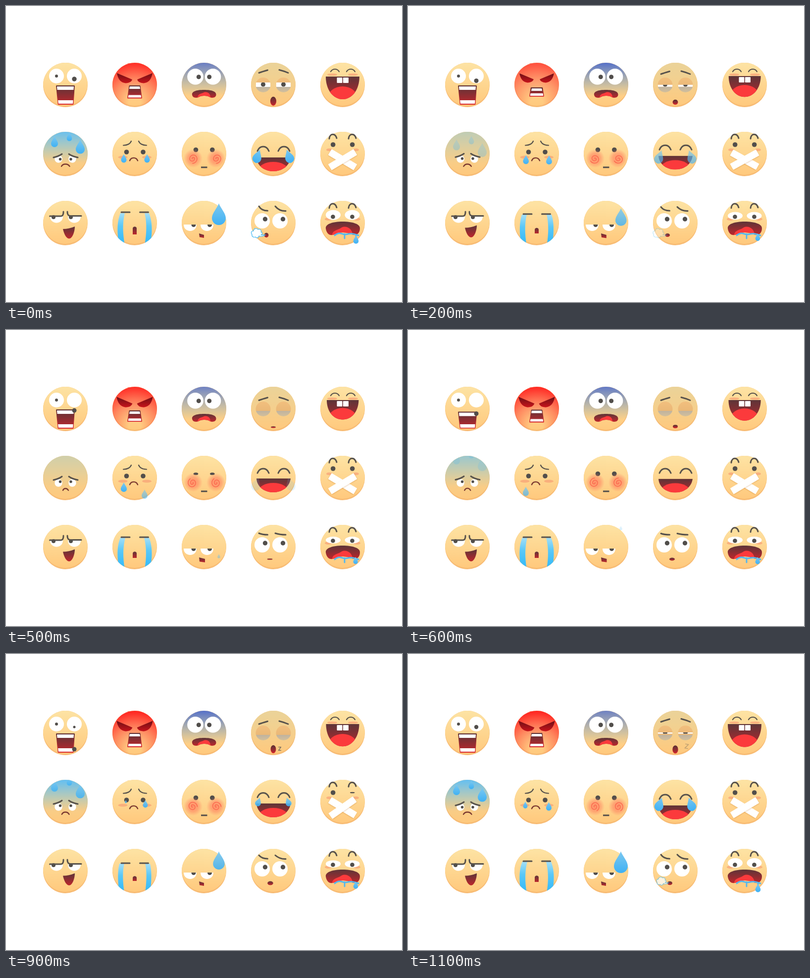
Animation of 800 by 600 pixels, one loop 1200 ms. Source, as an HTML page:

```html
<!DOCTYPE html>
<html lang="en">
<head>
<meta charset="utf-8">
<title>Fifteen moods</title>
<style>
  html, body { margin: 0; width: 100%; height: 100%; overflow: hidden; background: #fff; }
  svg { display: block; width: 800px; height: 600px; }
  .line { fill: none; stroke: #57524c; stroke-width: 3; stroke-linecap: round; stroke-linejoin: round; }
  .thin { stroke-width: 2.2; }
  .frown { fill: none; stroke: #7b3a31; stroke-width: 2.4; stroke-linecap: round; }
  .ink { fill: #514e4b; }
  .white { fill: #fff; }
  .red { fill: #fb3a3c; }
  .blush { fill: #f7a377; opacity: .75; }
  .mouth { fill: url(#gum); }
  .lips { fill: url(#gum); stroke: url(#lip); stroke-width: 1.8; stroke-linejoin: round; }
  .drop { fill: url(#water); }
  .tape { fill: #fff; filter: drop-shadow(0 1px 1px rgba(190, 110, 30, .35)); }
  .swirl { fill: none; stroke: #fb6a50; stroke-width: 1.5; stroke-linecap: round; }
  .zed { font: bold 11px Lato, "Open Sans", sans-serif; fill: #6f675c; }
</style>
</head>
<body>
<!-- data-<attr>="step:pose;…" holds the poses of one attribute over twelve steps -->
<svg viewBox="0 0 800 600">
  <defs>
    <linearGradient id="skin" x2="0" y2="1"><stop stop-color="#fde4a5"/><stop offset="1" stop-color="#ffc97d"/></linearGradient>
    <linearGradient id="gum" x2="0" y2="1"><stop stop-color="#5d3538"/><stop offset="1" stop-color="#bd262c"/></linearGradient>
    <linearGradient id="lip" x2="0" y2="1"><stop stop-color="#5c2c2f"/><stop offset="1" stop-color="#d9292f"/></linearGradient>
    <linearGradient id="water" x2="0" y2="1"><stop stop-color="#7cc8f0"/><stop offset="1" stop-color="#3fb1f4"/></linearGradient>
    <linearGradient id="stream" x2="0" y2="1"><stop stop-color="#a5def6"/><stop offset=".4" stop-color="#5ac8f8"/><stop offset="1" stop-color="#2fb8f8"/></linearGradient>
    <linearGradient id="glare" x2="0" y2="1"><stop stop-color="#6d0f15"/><stop offset="1" stop-color="#c8141b"/></linearGradient>
    <radialGradient id="rage" gradientUnits="userSpaceOnUse" cx="0" cy="36" r="82"><stop offset=".15" stop-color="#ff2a24" stop-opacity="0"/><stop offset=".55" stop-color="#ff2a24" stop-opacity=".45"/><stop offset=".95" stop-color="#ff2a24"/></radialGradient>
    <linearGradient id="fear" x2="0" y2="1"><stop stop-color="#556fc8"/><stop offset=".75" stop-color="#6a9cc0" stop-opacity="0"/></linearGradient>
    <linearGradient id="chill" x2="0" y2="1"><stop stop-color="#64bff2"/><stop offset=".7" stop-color="#7cc4e0" stop-opacity="0"/></linearGradient>
    <linearGradient id="dusk" x2="0" y2="1"><stop stop-color="#a89870" stop-opacity=".22"/><stop offset="1" stop-color="#a89870" stop-opacity="0"/></linearGradient>
    <linearGradient id="bag" x2="0" y2="1"><stop stop-color="#f2bf7e"/><stop offset=".63" stop-color="#eab877"/><stop offset=".63" stop-color="#bfb3a0"/><stop offset="1" stop-color="#d3bf9b"/></linearGradient>
    <radialGradient id="flush"><stop stop-color="#ff7a5c" stop-opacity=".75"/><stop offset=".55" stop-color="#ff7a5c" stop-opacity=".5"/><stop offset="1" stop-color="#ff7a5c" stop-opacity="0"/></radialGradient>

    <clipPath id="disc"><circle r="45"/></clipPath>
    <clipPath id="slit"><rect x="-15" width="30" y="-5" height="9"
      data-y="0:-5;1:-3.5;3:3;4:4;9:4;11:-1" data-height="0:9;1:6.5;3:1.3;4:0;9:0;11:2.5"/></clipPath>
    <clipPath id="laugh"><path data-d="0:M-34 -17 L34 -17 C34 10 19 29 0 29 C-19 29 -34 10 -34 -17Z;1:M-32.5 -18 L33 -18 C33 8 18 27 0 27 C-18 27 -32.5 8 -32.5 -18Z;3:M-32 -18 L32.5 -18 C32 6 18 21.5 0 21.5 C-18 21.5 -32 6 -32 -18Z;5:M-32 -18 L32.5 -18 C32 6 18 21.5 0 21.5 C-18 21.5 -32 6 -32 -18Z;7:M-33 -18 L33 -18 C33 8 18 26 0 26 C-18 26 -33 8 -33 -18Z;11:M-34 -18 L34 -18 C34 10 19 28.5 0 28.5 C-19 28.5 -34 10 -34 -18Z"/></clipPath>
    <clipPath id="grin"><path d="M-34 7H35C33 24 18 35 0 35S-33 24 -34 7Z"/></clipPath>
    <clipPath id="lids"><path d="M-30 9L-6 0H6L30 9V30H-30Z" data-transform="0:translate(0 0);3:translate(0 -1);5:translate(0 -3);7:translate(0 -4);9:translate(0 -3);11:translate(0 0)"/></clipPath>
    <clipPath id="below"><rect x="-45" y="3" width="90" height="30"/></clipPath>

    <g id="base">
      <circle r="45" fill="#f8bc74"/>
      <circle cy="-3" r="45" fill="url(#skin)" clip-path="url(#disc)"/>
    </g>
    <path id="drop" class="drop" d="M0 0C3 9 14 20 14 30A14 14 0 0 1 -14 30C-14 20 -3 9 0 0Z"/>
    <g id="sleepy">
      <circle r="15" fill="url(#bag)"/>
      <g clip-path="url(#slit)"><circle class="white" r="15"/><circle class="ink" cy="-1" r="4.6"/></g>
    </g>
    <path id="angry" fill="url(#glare)" d="M-36 -24L-5 -11Q-7 -4 -18 -3.5Q-33 -5 -36 -24Z"
      data-transform="0:translate(0 0) scale(1);1:translate(-1 -1) scale(.96);3:translate(-2 -1.5) scale(.89);5:translate(.5 .3) scale(1.03);11:translate(.5 .3) scale(1.03)"/>
    <path id="arc" class="line" d="M-11.5 0Q-8 -9 0 -9T11.5 0"/>
    <path id="arch" class="line" stroke-width="4" d="M-7 4C-6 -7 5 -8 8 3"/>
    <path id="lidded" class="white" d="M-13 0H13C13 8 7 13 0 13S-13 8 -13 0Z"/>
    <path id="spiral" class="swirl" d="M-1 0A2.5 2.5 0 0 1 4 0A5 5 0 0 1 -6 0A7.5 7.5 0 0 1 9 0A9.5 9.5 0 0 1 0 9.5"
      data-transform="0:rotate(0);12:rotate(360)"/>
    <path id="fall" fill="url(#stream)" data-d="0:M-29 -20 L-20 -20 C-25 0 -24 22 -20 45 L-31 45 C-37 18 -35 -6 -29 -20Z;1:M-29 -19 L-19 -19 C-24 0 -24 22 -20 45 L-31 45 C-37 18 -35 -6 -29 -19Z;3:M-31 -15 L-21 -15 C-25 0 -24 22 -21 45 L-31 45 C-35 18 -34 -4 -31 -15Z;5:M-29 -19 L-19 -19 C-24 0 -24 22 -20 45 L-31 45 C-37 18 -35 -6 -29 -19Z;7:M-29 -19 L-19 -19 C-24 0 -24 22 -20 45 L-31 45 C-37 18 -35 -6 -29 -19Z;9:M-31 -15 L-21 -15 C-25 0 -24 22 -21 45 L-31 45 C-35 18 -34 -4 -31 -15Z;11:M-29 -19 L-19 -19 C-24 0 -24 22 -20 45 L-31 45 C-37 18 -35 -6 -29 -19Z"/>
    <path id="tear" class="drop" d="M0 0C2 6 9 13 9 19.2A9 9 0 0 1 -9 19.2C-9 13 -2 6 0 0Z"
      data-transform="0:translate(0 0) scale(1);3:translate(0 2) scale(1);5:translate(0 8) scale(1);6:translate(0 -1) scale(.2);7:translate(0 -2) scale(.25);9:translate(0 0) scale(.65);11:translate(0 0) scale(1)"
      data-opacity="0:1;1:.75;3:.55;5:.15;6:0;7:.8;9:.9;11:1"/>
  </defs>

  <!-- shocked: an eye drops its pupil -->
  <g transform="translate(120 160)">
    <use href="#base"/>
    <circle class="white" cx="-18" cy="-18" r="15"/><circle class="ink" cx="-18" cy="-18" r="3"/>
    <circle class="white" cx="18" cy="-18" r="15"/>
    <path class="lips" data-d="0:M-18 2 L18 2 L15.5 39 L-14.5 39Z;5:M-18 2 L18 2 L15.5 39 L-14.5 39Z;7:M-18 11 L19 11 L15.5 38 L-14.5 38Z;9:M-18 2 L18 2 L15.5 39 L-14.5 39Z"/>
    <path class="white" d="M-17 3L17 3L16.5 10L-16.5 10Z" data-transform="0:translate(0 0);5:translate(0 0);7:translate(0 9);9:translate(0 0)"/>
    <path class="white" d="M-15 31L15.6 31L15 38L-14 38Z"/>
    <circle class="ink" cx="18" r="4.5" data-cy="0:-12;1:-11;3:-6;5:3;7:16;9:33;10:38;11:-12" data-opacity="0:1;9:1;10:0;11:0"/>
    <circle class="ink" cx="18" cy="-12" data-r="0:4.5;1:0;8:0;9:2.5;11:4.2"/>
  </g>

  <!-- furious -->
  <g transform="translate(260 160)">
    <use href="#base"/>
    <circle r="45" fill="url(#rage)" data-opacity="0:.95;1:.85;3:.7;5:.95;7:1;11:1"/>
    <use href="#angry"/><use href="#angry" transform="scale(-1 1)"/>
    <path class="lips" data-d="0:M-10.5 2 L10.5 2 L14 26.5 L-14 26.5Z;1:M-10.5 4 L10.5 4 L14 25 L-14 25Z;3:M-12 8 L12 8 L14 20.5 L-14 20.5Z;5:M-10.5 4 L10.5 4 L14 25 L-14 25Z;7:M-10 1 L10.5 1 L14 28 L-14 28Z;11:M-10 1 L10.5 1 L14 28 L-14 28Z"/>
    <path class="white" d="M-10 2L10 2L11 7L-11 7Z" data-transform="0:translate(0 1);1:translate(0 3);3:translate(0 7);5:translate(0 3);7:translate(0 0);11:translate(0 0)"/>
    <path class="white" d="M-12.5 20.5H12.5L13.2 25.5H-13.2Z" data-transform="0:translate(0 0);1:translate(0 -1.3);3:translate(0 -5.8);5:translate(0 -1.3);7:translate(0 1.5);11:translate(0 1.5)"/>
  </g>

  <!-- terrified -->
  <g transform="translate(400 160)">
    <use href="#base"/>
    <circle r="45" fill="url(#fear)" data-opacity="0:.88;1:1;3:1;5:.85;7:1;9:1;11:.85"/>
    <circle class="white" cx="-17.5" cy="-16.8" r="16.3"/><circle class="white" cx="18" cy="-16.8" r="16.3"/>
    <circle class="ink" cx="-10.7" cy="-16.3" r="4.5"/><circle class="ink" cx="10.7" cy="-16.3" r="4.5"/>
    <path class="mouth" d="M-24 20C-25 13 -15 10 0 10S25 13 24.500 20C24 26 17 27 12 25C7 21 -6 21 -11 25C-17 27 -23 26 -24 20Z"/>
    <path class="red" d="M-13 25.500C-12 17 -5 18 0 15C9 13 13 19 13 25.300C7 21 -6 21 -13 25.500Z"/>
  </g>

  <!-- sleepy -->
  <g transform="translate(540 160)">
    <use href="#base"/>
    <circle r="45" fill="url(#dusk)"/>
    <g data-transform="0:translate(0 0);1:translate(0 1);3:translate(0 4);5:translate(0 7);7:translate(0 7);9:translate(0 6.5);11:translate(0 2)">
      <path class="line" d="M-29 -24.500Q-22 -27 -11.500 -30M12 -30.500Q22 -28 30 -24.500"/>
    </g>
    <use href="#sleepy" x="-20.500"/><use href="#sleepy" x="20.500"/>
    <ellipse class="lips" data-cy="0:33;1:34;3:36;5:37;7:34.500;9:33;11:33.500" data-rx="0:5.200;3:4.200;5:4;7:4.200;11:4.800" data-ry="0:8.300;1:5.700;3:2.800;5:.8;7:4.200;9:7.300;11:7.300"/>
    <text class="zed" text-anchor="middle" data-transform="0:translate(24 28) scale(1.300) rotate(10);1:translate(26 25) scale(1.300) rotate(10);8:translate(9 37) scale(.6) rotate(0);9:translate(13 36) scale(1) rotate(0);11:translate(22 32) scale(1.250) rotate(10)" data-opacity="0:0;8:0;9:1;11:.4">Z</text>
  </g>

  <!-- big laugh -->
  <g transform="translate(680 160)">
    <use href="#base"/>
    <path class="line thin" d="M-24 -27Q-21 -32 -15.500 -32T-7 -27M8 -27Q11 -32 16.500 -32T25 -27"/>
    <ellipse class="blush" cx="-21" cy="-21" rx="10" ry="2.300"/><ellipse class="blush" cx="21" cy="-21" rx="10" ry="2.300"/>
    <g clip-path="url(#laugh)">
      <rect class="mouth" x="-36" y="-18" width="72" height="48"/>
      <ellipse class="red" rx="29" ry="22" data-cy="0:25;1:24;3:20;5:20;7:22;9:24;11:25"/>
      <g class="white" data-transform="0:translate(0 0);1:translate(0 -1);11:translate(0 -1)">
        <rect x="-11.500" y="-15" width="11" height="11" rx="1"/><rect x="1" y="-15" width="11" height="11" rx="1"/>
      </g>
    </g>
  </g>

  <!-- cold sweat -->
  <g transform="translate(120 300)">
    <use href="#base"/>
    <circle r="45" fill="url(#dusk)"/>
    <circle r="45" fill="url(#chill)" data-opacity="0:.95;1:.65;3:0;5:.2;7:1;11:1"/>
    <g clip-path="url(#disc)">
      <g data-transform="0:translate(0 0);1:translate(0 4);3:translate(0 9);5:translate(0 -16);7:translate(0 -11);9:translate(0 -7);11:translate(0 0)" data-opacity="0:1;1:.55;3:0;5:0;7:.4;9:.85;11:1">
        <use href="#drop" transform="translate(-22 -36) scale(.5)"/>
        <use href="#drop" transform="translate(8 -43) scale(.38)"/>
        <use href="#drop" transform="translate(30 -29) scale(.65)"/>
      </g>
    </g>
    <g clip-path="url(#lids)">
      <circle class="white" cx="-14" cy="10" r="7.700"/><circle class="white" cx="14" cy="10" r="7.700"/>
      <g class="ink" data-transform="0:translate(0 0);5:translate(0 -3);9:translate(0 -3);11:translate(0 0)">
        <circle cx="-10.500" cy="10.500" r="2.700"/><circle cx="11" cy="10.500" r="2.700"/>
      </g>
    </g>
    <path class="line" d="M-24 7Q-14 5 -7 0M7 0Q14 5 25 7" data-transform="0:translate(0 0);3:translate(0 -1);5:translate(0 -3);7:translate(0 -4);9:translate(0 -3);11:translate(0 0)"/>
    <path class="frown" data-d="0:M-8 25 C-5 19 5 19 8.500 25;3:M-7.500 25 C-4 19 4 19 7.500 25;5:M-5 25 C-3 20 3 20 6 25;7:M-6.500 25 C-4 19 4 19 6.500 25;11:M-8 25 C-5 19 5 19 8.500 25"/>
  </g>

  <!-- weeping -->
  <g transform="translate(260 300)">
    <use href="#base"/>
    <path class="line thin" d="M-23 -17.500Q-10 -18 -7 -26M8 -26Q11 -18 24 -17.500"/>
    <ellipse class="blush" cx="-24" cy="6.500" rx="9.500" ry="3"/><ellipse class="blush" cx="24.500" cy="6.500" rx="9.500" ry="3"/>
    <circle class="ink" cx="-16.500" cy="-4" r="4.800"/><circle class="ink" cx="17" cy="-4" r="4.800"/>
    <use href="#drop" data-transform="0:translate(-22 0) scale(.4);1:translate(-22 0) scale(.42);3:translate(-21.500 4) scale(.42);5:translate(-22 9) scale(.44);7:translate(-22 26) scale(.42);8:translate(-17 -5) scale(.05);9:translate(-18 -4) scale(.15);11:translate(-23 -1) scale(.32)" data-opacity="0:1;5:1;7:.4;8:0;9:.8;11:.95"/>
    <use href="#drop" data-transform="0:translate(25 0) scale(.4);1:translate(25 1) scale(.42);3:translate(25 4) scale(.43);5:translate(20 23) scale(.43);6:translate(17 -6) scale(.05);7:translate(19 -5) scale(.18);9:translate(21.500 -4) scale(.35);11:translate(24.500 0) scale(.4)" data-opacity="0:1;3:.95;5:.6;6:0;7:.9;11:1"/>
    <path class="frown" d="M-10 13.500C-7 6 3 6 6 13.500"/>
  </g>

  <!-- dizzy blush -->
  <g transform="translate(400 300)">
    <use href="#base"/>
    <g class="ink">
      <ellipse cx="-16.500" cy="-8.500" rx="4.800" data-ry="0:4.800;2:4.800;3:1.300;5:2.500;6:4.800"/>
      <ellipse cx="16.800" cy="-8.500" rx="4.800" data-ry="0:4.800;2:4.800;3:1.300;5:2.500;6:4.800"/>
      <rect x="-6" y="25.500" width="12.500" height="3"/>
    </g>
    <g clip-path="url(#disc)">
      <circle cx="-22" cy="9" r="19" fill="url(#flush)"/><circle cx="24" cy="9" r="19" fill="url(#flush)"/>
    </g>
    <use href="#spiral" x="-23" y="9.500"/><use href="#spiral" x="25" y="9.500"/>
  </g>

  <!-- tears of joy -->
  <g transform="translate(540 300)">
    <use href="#base"/>
    <g data-transform="0:translate(0 0);1:translate(0 -1.500);3:translate(0 -4);7:translate(0 -4);9:translate(0 -3.500);11:translate(0 0)">
      <use href="#arc" x="-20.500" y="-6"/><use href="#arc" x="21.500" y="-6"/>
    </g>
    <g data-transform="0:translate(0 0);1:translate(0 -2);3:translate(0 -5);5:translate(0 -6);7:translate(0 -5);9:translate(0 -4);11:translate(0 0)">
      <g clip-path="url(#grin)">
        <rect class="mouth" x="-36" y="7" width="72" height="29"/>
        <ellipse class="red" cy="33" rx="30" ry="17"/>
      </g>
    </g>
    <g transform="translate(-27 -9) rotate(19)"><use href="#tear"/></g>
    <g transform="translate(27 -9) rotate(-19)"><use href="#tear"/></g>
  </g>

  <!-- taped mouth -->
  <g transform="translate(680 300)">
    <use href="#base"/>
    <use href="#arch" x="-20" y="-35"/><use href="#arch" x="19" y="-35"/>
    <circle class="ink" cx="-19.300" cy="-19" r="4.800"/>
    <ellipse class="ink" cx="19.700" cy="-19" rx="4.800" data-ry="0:4.800;7:4.800;9:1.300;11:4.800"/>
    <ellipse class="blush" cx="-27" cy="-8.500" rx="6" ry="2.800"/><ellipse class="blush" cx="27" cy="-8.500" rx="6" ry="2.800"/>
    <g transform="translate(0 11.500)">
      <rect class="tape" x="-30" y="-7" width="60" height="14" rx="1" data-transform="0:rotate(31);1:rotate(32);3:rotate(26);5:rotate(31);11:rotate(31)"/>
      <rect class="tape" x="-30" y="-7" width="60" height="14" rx="1" data-transform="0:rotate(-31);1:rotate(-32);3:rotate(-26);5:rotate(-31);7:rotate(-31);9:rotate(-35);11:rotate(-31)"/>
    </g>
  </g>

  <!-- smirk -->
  <g transform="translate(120 440)">
    <use href="#base"/>
    <use href="#lidded" x="-18" y="-13.500"/><use href="#lidded" x="18" y="-13.500"/>
    <circle class="ink" cx="-24" cy="-12" r="4"/><circle class="ink" cx="11" cy="-12" r="4"/>
    <path class="line" d="M-31.500 -14H-10Q-3.500 -14 -4 -23M4 -23Q3.500 -14.500 11 -14.500H32"/>
    <path class="mouth" d="M-5 12Q7 12 19 7C19 18 14 31.500 7.500 31.500C1 31 -3 21 -5 12Z" data-transform="0:translate(0 0);1:translate(0 -2.500);11:translate(0 -2.500)"/>
  </g>

  <!-- bawling -->
  <g transform="translate(260 440)">
    <use href="#base"/>
    <g clip-path="url(#disc)"><use href="#fall"/><use href="#fall" transform="scale(-1 1)"/></g>
    <path class="line" d="M-27 -22H-10M10.500 -22H27.500" data-transform="0:translate(0 0);1:translate(0 1.500);3:translate(0 6);5:translate(0 2);7:translate(0 2);9:translate(0 6);11:translate(0 2)"/>
    <path class="mouth" data-d="0:M-4 23 L-4 11 C-4 6 4 6 4 11 L4 23Z;1:M-4 22 L-4 13 C-4 8 4 8 4 13 L4 22Z;3:M-4 20 L-4 14 C-4 9 4 9 4 14 L4 20Z;5:M-4 22 L-4 13 C-4 8 4 8 4 13 L4 22Z;7:M-4 22 L-4 13 C-4 8 4 8 4 13 L4 22Z;9:M-4 20 L-4 14 C-4 9 4 9 4 14 L4 20Z;11:M-4 22 L-4 13 C-4 8 4 8 4 13 L4 22Z"/>
  </g>

  <!-- speechless -->
  <g transform="translate(400 440)">
    <use href="#base"/>
    <use href="#lidded" x="-28" y="3"/><use href="#lidded" x="6" y="3"/>
    <g class="ink" clip-path="url(#below)"><circle cx="-21" cy="3.500" r="4.500"/><circle cx="11.500" cy="3.500" r="4.500"/></g>
    <path class="mouth" data-d="0:M-10 21 L0 24 L0 30 L-9 28.500Z;5:M-10 21 L2 24 L2 31 L-9 29.500Z;9:M-10 21 L0 24 L0 30 L-9 28.500Z"/>
    <use href="#drop" data-transform="0:translate(30 -40) scale(1);1:translate(30 -37) scale(.93);3:translate(30.500 -23) scale(.69);5:translate(30 14) scale(.2);6:translate(30 -43) scale(.2);7:translate(30 -41) scale(.48);9:translate(30 -40) scale(.84);11:translate(30 -40) scale(1)" data-opacity="0:1;1:.95;3:.7;5:.4;6:.2;7:.7;9:.9;11:1"/>
  </g>

  <!-- sigh -->
  <g transform="translate(540 440)">
    <use href="#base"/>
    <path class="line" data-d="0:M-29 -34 Q-24 -25 -11.500 -25 M4 -34 Q12 -24 25 -24.500;3:M-29 -32 Q-23 -25 -11.500 -25 M4 -32 Q13 -24 25 -24.500;5:M-29 -28 Q-22 -25 -11.500 -25 M4 -28 Q13 -25 25 -25;7:M-29 -27 Q-22 -25 -11.500 -25 M4 -27 Q13 -25 25 -25;9:M-29 -32 Q-23 -25 -11.500 -25 M4 -32 Q13 -24 25 -24.500"/>
    <circle class="white" cx="-22.500" cy="-4.500" r="15.500"/><circle class="white" cx="13.500" cy="-4.500" r="15.500"/>
    <circle class="ink" cx="-16.500" cy="-8" r="4.700"/><circle class="ink" cx="19.500" cy="-8" r="4.700"/>
    <ellipse class="mouth" cy="24.500" data-cx="0:-14;1:-15;3:-16.500;5:-7;7:-6;9:-6;11:-11" data-rx="0:4.500;3:5;5:5.500;9:5.800;11:5" data-ry="0:4.700;1:4.500;3:2.500;5:1.300;7:4.500;9:4;11:3.800"/>
    <path class="white" stroke="#4dbcf3" stroke-width="1.300" stroke-linejoin="round"
      d="M-11 3C-14 0 -12 -5 -8 -4C-8 -9 -1 -11 1 -7C5 -9 9 -5 7 -2C11 -1 10 3 7 4L16 4C12 7 6 8 3 6C3 10 -3 11 -4 8C-8 10 -12 7 -11 3Z"
      data-transform="0:translate(-32 20) scale(1);3:translate(-33 20) scale(1);9:translate(-22 22) scale(.5);11:translate(-27 20) scale(.88)" data-opacity="0:1;1:.6;3:.05;4:0;9:0;11:.75"/>
  </g>

  <!-- drooling -->
  <g transform="translate(680 440)">
    <use href="#base"/>
    <use href="#arch" x="-20" y="-34.500"/><use href="#arch" x="19" y="-34.500"/>
    <ellipse class="blush" cx="-29" cy="-8" rx="7" ry="3"/><ellipse class="blush" cx="29" cy="-8" rx="7" ry="3"/>
    <g class="white">
      <ellipse cx="-19" rx="15" data-cy="0:-16.500;1:-15.500;3:-14;9:-14.500;11:-16.500" data-ry="0:10;1:8.500;3:6.800;9:7.300;11:9.700"/>
      <ellipse cx="19.500" rx="15" data-cy="0:-16.500;1:-15.500;3:-14;9:-14.500;11:-16.500" data-ry="0:10;1:8.500;3:6.800;9:7.300;11:9.700"/>
    </g>
    <circle class="ink" cx="-19.500" cy="-12.700" r="4.300"/><circle class="ink" cx="19.500" cy="-12.700" r="4.300"/>
    <path class="mouth" d="M-34 11C-35 2 -20 -3 0 -3S36 2 35 11C35 20 29 25 22 24C15 22 10 19 0 19S-14 23 -20 24C-28 26 -33 19 -34 11Z"/>
    <path class="red" d="M-21 24C-20 14 -10 15 -2 9C8 4 20 12 20 23.500C14 20 8 19 0 19S-14 23 -21 24Z"/>
    <path fill="none" stroke="#55b8ee" stroke-width="3" stroke-linecap="round" stroke-linejoin="round" d="M-16 25Q-9 19 -2 21.500T12 22T32 25M4 22V31M27 25V30"/>
    <use href="#drop" data-transform="0:translate(27 25) scale(.38);1:translate(27 23) scale(.36);3:translate(26 19) scale(.33);9:translate(26.500 21) scale(.34);11:translate(27 26) scale(.38)"/>
  </g>
</svg>
<script>
  const STEPS = 12, STEP_MS = 100;
  const NUMBER = /-?\d*\.?\d+/g;

  const readKeys = text => {
    const keys = text.split(';').map(part => {
      const [at, pose] = part.split(':');
      return { at: +at, pose };
    });
    return [...keys, { at: STEPS, pose: keys[0].pose }];
  };

  const tracks = [...document.querySelectorAll('svg *')].flatMap(el =>
    [...el.attributes]
      .filter(({ name }) => name.startsWith('data-'))
      .map(({ name, value }) => ({ el, attr: name.slice(5), keys: readKeys(value) })));

  // Blend every number of one pose towards the same number of the next.
  const mix = (from, to, k) => {
    const goal = to.match(NUMBER);
    let i = 0;
    return from.replace(NUMBER, n => +(+n + (goal[i++] - n) * k).toFixed(3));
  };

  const poseAt = (keys, step) => {
    const next = keys.findIndex(key => key.at > step);
    const a = keys[next - 1], b = keys[next];
    return mix(a.pose, b.pose, (step - a.at) / (b.at - a.at));
  };

  const start = performance.now();
  let shown = -1;

  function draw() {
    const elapsed = Math.max(0, performance.now() - start);
    const step = Math.floor(elapsed / STEP_MS) % STEPS;
    if (step !== shown) {
      shown = step;
      for (const { el, attr, keys } of tracks) el.setAttribute(attr, poseAt(keys, step));
    }
    requestAnimationFrame(draw);
  }
  draw();
</script>
</body>
</html>
```
